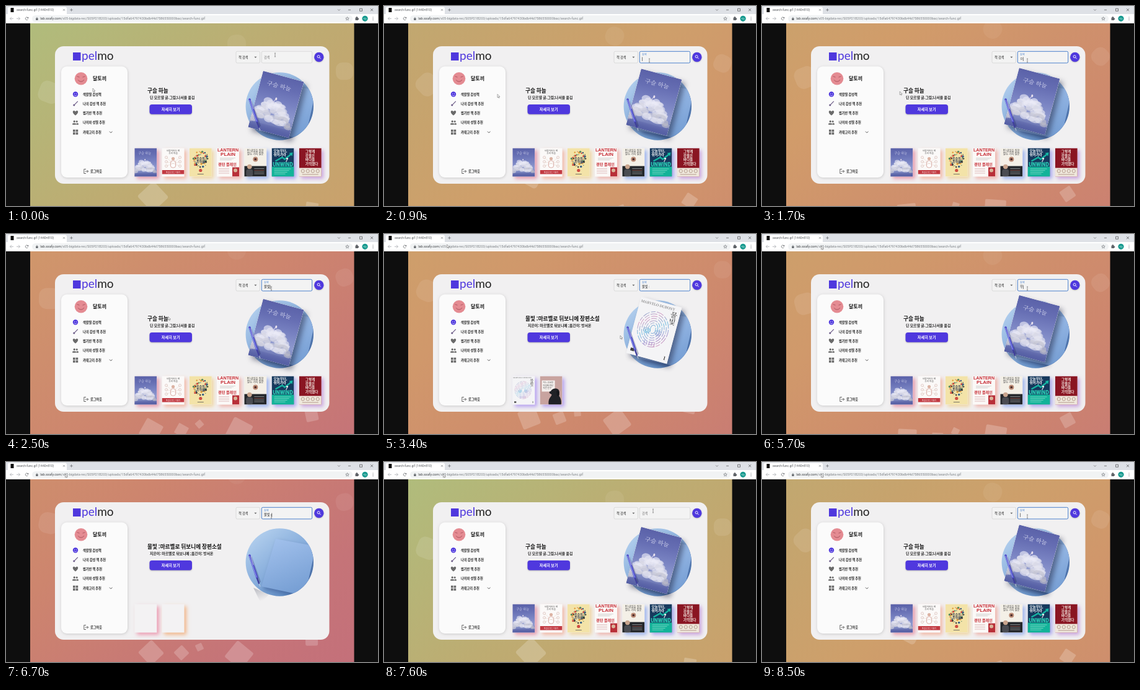
Write an HTML page with a canvas that moves like this. It is 600x323 px and loops after 8600 ms.

```html
<!DOCTYPE html>
<html lang="ko">
<head>
<meta charset="utf-8">
<title>Book search</title>
<style>
html, body { margin: 0; width: 100%; height: 100%; overflow: hidden; background: #0e0e0e; }
canvas { display: block; width: 600px; height: 323px; }
</style>
</head>
<body>
<canvas id="stage"></canvas>
<script>
const W = 600, H = 323, LOOP = 8600, CYCLE = 3800, LEAD = 50;
const SANS = '"Noto Sans CJK KR", "Noto Sans CJK", "Noto Sans", sans-serif';
const SERIF = '"Noto Serif CJK KR", "Noto Serif", serif';
const UI = 'Roboto, "Noto Sans", sans-serif';
const PURPLE = '#4f38de', INK = '#222';
const canvas = document.getElementById('stage');
const ctx = canvas.getContext('2d');
const dpr = window.devicePixelRatio || 1;
canvas.width = W * dpr;
canvas.height = H * dpr;

const clamp = (v, a, b) => Math.min(b, Math.max(a, v));
const lerp = (a, b, k) => a + (b - a) * k;

// keys: rows of [time, value, value, ...]
function track(keys, t) {
  let i = 0;
  while (i < keys.length - 2 && t >= keys[i + 1][0]) i++;
  const a = keys[i], b = keys[i + 1];
  const k = clamp((t - a[0]) / (b[0] - a[0]), 0, 1);
  return a.slice(1).map((v, j) => lerp(v, b[j + 1], k));
}

function text(s, x, y, size, color = INK, weight = 400, family = SANS, align = 'left') {
  ctx.font = `${weight} ${size}px ${family}`;
  ctx.textAlign = align;
  ctx.fillStyle = color;
  ctx.fillText(s, x, y);
}
function rect(x, y, w, h, color) {
  ctx.fillStyle = color;
  ctx.fillRect(x, y, w, h);
}
function round(x, y, w, h, r, color, stroke, lw = 0.6) {
  ctx.beginPath();
  ctx.roundRect(x, y, w, h, r);
  if (color) { ctx.fillStyle = color; ctx.fill(); }
  if (stroke) { ctx.strokeStyle = stroke; ctx.lineWidth = lw; ctx.stroke(); }
}
function dot(x, y, r, color) {
  ctx.beginPath();
  ctx.arc(x, y, r, 0, 7);
  ctx.fillStyle = color;
  ctx.fill();
}
function arc(x, y, r, a, b, color, lw) {
  ctx.beginPath();
  ctx.arc(x, y, r, a, b);
  ctx.strokeStyle = color;
  ctx.lineWidth = lw;
  ctx.stroke();
}
function line(color, lw, ...p) {
  ctx.beginPath();
  for (let i = 0; i < p.length; i += 2) ctx.lineTo(p[i], p[i + 1]);
  ctx.strokeStyle = color;
  ctx.lineWidth = lw;
  ctx.stroke();
}
function poly(color, ...p) {
  ctx.beginPath();
  for (let i = 0; i < p.length; i += 2) ctx.lineTo(p[i], p[i + 1]);
  ctx.closePath();
  ctx.fillStyle = color;
  ctx.fill();
}
function oval(x, y, rx, ry, color, turn = 0) {
  ctx.beginPath();
  ctx.ellipse(x, y, rx, ry, turn, 0, 7);
  ctx.fillStyle = color;
  ctx.fill();
}
function ramp(x0, y0, x1, y1, ...stops) {
  const g = ctx.createLinearGradient(x0, y0, x1, y1);
  stops.forEach((c, i) => g.addColorStop(i / (stops.length - 1), c));
  return g;
}
function shadow(color, blur, dx, dy, draw) {
  ctx.save();
  ctx.shadowColor = color;
  ctx.shadowBlur = blur * dpr;
  ctx.shadowOffsetX = dx * dpr;
  ctx.shadowOffsetY = dy * dpr;
  draw();
  ctx.restore();
}
function local(x, y, turn, sx, sy, draw) {
  ctx.save();
  ctx.translate(x, y);
  ctx.rotate(turn);
  ctx.scale(sx, sy);
  draw();
  ctx.restore();
}

function browser() {
  rect(0, 0, W, 13, '#dee1e6');
  round(3, 1.5, 95, 13, [3, 3, 0, 0], '#fff');
  rect(0, 13, W, 15, '#fff');
  rect(7.5, 3, 5, 7, '#111');
  text('search-func.gif (1440×810)', 17, 8.4, 5, '#55585c', 400, UI);
  const c = '#5f6368', pale = '#a9acb0';
  line(c, 0.6, 92, 4.8, 95, 7.8); line(c, 0.6, 95, 4.8, 92, 7.8);
  line(c, 0.7, 103.2, 6.3, 107.8, 6.3); line(c, 0.7, 105.5, 4, 105.5, 8.6);
  line('#555', 0.6, 535, 5.3, 537, 7.3, 539, 5.3);
  line('#333', 0.6, 552, 6.3, 556, 6.3);
  round(570.5, 4.2, 4, 4, 0, null, '#333');
  line('#333', 0.6, 588, 4.2, 592, 8.2); line('#333', 0.6, 592, 4.2, 588, 8.2);

  line(pale, 0.8, 12, 20.3, 6.5, 20.3); line(pale, 0.8, 9, 17.8, 6.5, 20.3, 9, 22.8);
  line(pale, 0.8, 17, 20.3, 22.5, 20.3); line(pale, 0.8, 20, 17.8, 22.5, 20.3, 20, 22.8);
  arc(33.5, 20.3, 2.3, 0.5, 5.6, c, 0.7);
  poly(c, 34.1, 19.9, 36.2, 19.9, 36.2, 17.6);
  round(42, 15, 517, 10.8, 5.4, '#f1f3f4');
  round(48.2, 19.8, 3.4, 3, 0.4, c);
  arc(49.9, 19.6, 1.1, Math.PI, 0, c, 0.6);
  const host = 'lab.ssafy.com';
  text(host, 55.3, 22.3, 5.45, '#3a3d41', 400, UI);
  const w = ctx.measureText(host).width;
  text('/s05-bigdata-rec/S05P21B203/uploads/15dfa64797430bdb44d7586550000bac/search-func.gif',
    55.3 + w, 22.3, 5.45, '#7c8085', 400, UI);
  ctx.beginPath();
  for (let i = 0; i < 10; i++) {
    const r = i % 2 ? 1.3 : 2.9, a = i * Math.PI / 5 - Math.PI / 2;
    ctx.lineTo(550.5 + r * Math.cos(a), 20.5 + r * Math.sin(a));
  }
  ctx.closePath();
  ctx.strokeStyle = c; ctx.lineWidth = 0.6; ctx.stroke();
  round(563.5, 18.5, 4.6, 4.6, 0.6, c);
  dot(565.8, 18.2, 1.1, c); dot(568.2, 20.8, 1.1, c);
  dot(579, 20.3, 4.6, '#15998e');
  text('하늘', 579, 21.5, 3, '#fff', 400, SANS, 'center');
  for (const y of [18, 20.3, 22.6]) dot(592, y, 0.6, c);
}

const HUES = [[176, 188, 124], [192, 168, 112], [209, 157, 106], [205, 134, 110], [196, 112, 122]];
function hue(u) {
  const p = clamp(u, 0, 1) * 4, i = Math.min(3, Math.floor(p));
  return `rgb(${HUES[i].map((v, j) => Math.round(lerp(v, HUES[i + 1][j], p - i)))})`;
}
// x, y at cycle start, size, speed (px/s)
const SQUARES = [
  [237, 310, 36, 40], [372, 62, 30, 14], [546, 106, 28, 14], [70, 140, 34, 14], [493, 328, 20, 14],
  [283, 373, 18, 22], [312, 358, 11, 20], [376, 356, 34, 15], [234, 373, 30, 22]
];
function backdrop(q) {
  const [u] = track([[0, 0], [50, 0], [950, 0.26], [2550, 0.56], [2950, 0.66], [3450, 0.45], [3800, 0.4]], q);
  ctx.save();
  ctx.beginPath();
  ctx.rect(39, 28, 522.5, 295);
  ctx.clip();
  rect(38, 28, 525, 295, ramp(110, -40, 490, 390, ...[0, 1, 2, 3, 4].map(i => hue(u + i * 0.1))));
  // squares turn into circles and fade as they rise
  for (const [x, y0, size, v] of SQUARES) {
    const y = y0 - v * q / 1000, p = clamp((377 - y) / 363, 0, 1);
    local(x, y, p * 4 * Math.PI, 1, 1, () =>
      round(-size / 2, -size / 2, size, size, size * p / 2, `rgba(255,255,255,${0.04 + 0.2 * (1 - p)})`));
  }
  ctx.restore();
}

function smile(x, y, r, color) {
  dot(x - r * 0.35, y - r * 0.25, r * 0.15, color);
  dot(x + r * 0.35, y - r * 0.25, r * 0.15, color);
  arc(x, y + r * 0.05, r * 0.55, 0.25, 2.9, color, r * 0.16);
}

const MENU = ['색깔별 감성책', '나의 감성 책 추천', '찜기반 책 추천', '나이와 성별 추천', '카테고리 추천'];
function sidebar() {
  shadow('rgba(0,0,0,.16)', 4, 0.5, 1, () => round(89, 97.5, 107, 179.5, 9, '#fbfbfb'));
  dot(121, 117.3, 10.3, '#e48b92');
  line('#9a4450', 0.7, 114.5, 113.5, 118.5, 115); line('#9a4450', 0.7, 123.5, 115, 127.5, 113.5);
  arc(121, 116.5, 5.5, 0.5, 2.6, '#9a4450', 0.8);
  text('달토끼', 140, 120.2, 8, '#111', 700);
  MENU.forEach((s, i) => text(s, 124, 144.6 + i * 15.25, 5.2, INK, 700));
  const g = '#6a6a6a';
  dot(112, 142.5, 4.2, PURPLE);
  smile(112, 142.5, 4, '#fff');
  line('#6a5a86', 1.2, 115.8, 153.8, 111, 158.8);
  dot(109.8, 160, 1.6, '#6a5a86');
  ctx.beginPath();
  ctx.moveTo(112, 176.8);
  ctx.bezierCurveTo(104, 170.5, 109.5, 166.5, 112, 170.5);
  ctx.bezierCurveTo(114.5, 166.5, 120, 170.5, 112, 176.8);
  ctx.fillStyle = g;
  ctx.fill();
  dot(110.2, 186.4, 1.6, g); dot(114.2, 186.4, 1.5, g);
  round(107.2, 189.2, 5.6, 2.6, [1.3, 1.3, 0, 0], g);
  round(113.4, 189.2, 3.4, 2.6, [1, 1, 0, 0], g);
  for (const [x, y] of [[108, 199.6], [112.6, 199.6], [108, 204.1], [112.6, 204.1]]) rect(x, y, 3.6, 3.6, g);
  line('#444', 0.9, 167, 202.6, 169.2, 204.8, 171.4, 202.6);
  line('#444', 0.8, 129, 263.5, 125.8, 263.5, 125.8, 270.5, 129, 270.5);
  line('#444', 0.8, 127.7, 267, 132.5, 267);
  line('#444', 0.8, 130.7, 265, 132.7, 267, 130.7, 269);
  text('로그아웃', 136, 269, 5.2, INK, 700);
}

const TYPED = [[0, ''], [1700, 'ㅁ'], [1850, '무'], [2000, '물'], [2250, '물비'], [2450, '물빛'], [2650, '물빛 '], [2800, '물빛 :']];
function header(q) {
  rect(108, 75, 12.5, 13, PURPLE);
  text('pel', 122, 87, 19, PURPLE, 400, 'Lato, sans-serif');
  text('mo', 122 + ctx.measureText('pel').width, 87, 19, '#222', 400, 'Lato, sans-serif');
  round(371, 73.3, 38.5, 18.7, 2, '#f3f3f3', '#cacaca');
  text('책 검색', 375, 84.5, 5.2, INK, 500);
  poly('#666', 400.4, 81.8, 404.4, 81.8, 402.4, 83.9);
  const focus = q > 500, blue = '#4a80cc';
  round(412.3, 73.3, 81.4, 18.7, 2, '#f3f3f3', focus ? blue : '#cacaca', focus ? 1 : 0.6);
  if (focus) {
    const s = TYPED.filter(k => q >= k[0]).pop()[1];
    text('검색', 416, 80.2, 4.1, blue, 500);
    text(s, 416, 87.4, 5.2, INK, 500);
    const x = 416.6 + ctx.measureText(s).width;
    if (q < 3200) line('#222', 0.6, x, 82.5, x, 88.9);
  } else text('검색', 416, 84.5, 5.2, '#777');
  shadow('rgba(0,0,0,.25)', 2, 0, 0.7, () => dot(504.8, 82.5, 7.7, PURPLE));
  arc(504.1, 81.7, 2, 0, 7, '#fff', 0.9);
  line('#fff', 1, 505.6, 83.2, 507.7, 85.3);
}

// large covers use a 66 x 98 box, the others 36 x 46
function clouds() {
  rect(0, 0, 66, 98, ramp(0, 0, 6, 98, '#5a61a8', '#666eb3', '#7983c2', '#8f9acf', '#5a64a6'));
  // cumulus: a heap of puffs, wide below and narrow at the top
  for (let i = 0; i < 46; i++) {
    const k = i / 45, spread = 9 + 23 * k;
    const x = 30 + spread * Math.sin(i * 2.4), y = 47 + 34 * k + 2 * Math.cos(i * 1.7);
    const v = Math.round(236 - 50 * (0.5 + 0.5 * Math.sin(i * 1.3)) * k);
    oval(x, y, 4.5 + i % 4 * 1.5, 4 + i % 3, `rgba(${v},${v},${v + 12},.65)`);
  }
  rect(0, 86, 66, 12, ramp(0, 84, 0, 98, 'rgba(90,98,168,.25)', '#555fa4'));
  oval(31, 40, 1.5, 2.5, '#e9e1ee');
  line('#d9d5ea', 1, 30, 42, 27, 47);
  text('구슬 하늘', 30, 21, 9.4, '#dfe1f4', 400, SERIF, 'center');
}
function maze() {
  rect(0, 0, 66, 98, '#f4f4f6');
  text('MARVELO DUBONY', 29, 8.5, 5.6, '#555', 400, SERIF, 'center');
  ctx.strokeStyle = ramp(8, 20, 52, 75, '#65b6d8', '#d79ac3', '#72bfe0', '#a899d2', '#de91b2');
  ctx.lineWidth = 1;
  for (let k = 0; k < 7; k++) {
    ctx.setLineDash([7 + k * 1.7, 2, 12 - k, 2.4]);
    ctx.lineDashOffset = k * 7;
    ctx.beginPath();
    ctx.ellipse(31, 48, 24 - k * 3.3, 30 - k * 3.8, 0, 0, 7);
    ctx.stroke();
  }
  ctx.setLineDash([]);
  for (const x of [22, 40]) for (const r of [5, 2.5]) {
    ctx.beginPath();
    ctx.ellipse(x, 52, r, r * 0.85, 0, 0, 7);
    ctx.stroke();
  }
  for (let i = 0; i < 5; i++) line(ctx.strokeStyle, 1, 23 + i * 4, 69, 23 + i * 4, 76);
  text('물', 57, 20, 11.5, '#333', 500, SERIF, 'center');
  text('빛', 57, 32, 11.5, '#333', 500, SERIF, 'center');
  rect(5, 87, 6, 5, '#444');
  text('1', 58, 93, 8, '#333', 600, SERIF);
}
function figure() {
  rect(0, 0, 36, 46, '#fbf9f8');
  text('사람이라는 먼', 18, 5, 3.8, '#555', 500, SANS, 'center');
  text('우리 마음', 18, 9.5, 3.8, '#555', 500, SANS, 'center');
  dot(18, 17, 2.6, '#dcb3a3');
  round(14, 20.5, 8, 11, 3, '#fff', '#c98a80', 0.7);
  for (let i = 0; i < 6; i++) {
    const x = i % 2 ? 29 : 7, y = 15 + (i >> 1) * 7;
    arc(x, y, 2, 0, 7, '#c9a096', 0.5);
    line('#ddc4bc', 0.4, x, y, 18, 25);
  }
  rect(0, 35.5, 36, 6.5, '#c23a42');
  text('마음을 읽는 이야기', 18, 40, 3, '#fff', 500, SANS, 'center');
}
function doodles() {
  rect(0, 0, 36, 46, '#f3e3a8');
  const tones = ['#cf4d41', '#345e83', '#e29b38', '#5d8a62', '#333'];
  for (let i = 0; i < 40; i++) {
    const a = i * 2.4, r = 8 + i % 4 * 1.7;
    dot(18 + r * Math.cos(a), 18 + r * 0.95 * Math.sin(a), 0.7 + i % 3 * 0.5, tones[i % 5]);
  }
  text('호수의', 18, 18, 5, '#2d344c', 700, SANS, 'center');
  text('조약돌', 18, 23.5, 5, '#2d344c', 700, SANS, 'center');
  dot(18, 36, 2.6, '#cf4d41');
  line('#444', 0.7, 13, 42, 23, 42);
}
function lantern() {
  rect(0, 0, 36, 46, '#fbf9f7');
  text('LANTERN', 18, 5.5, 7.2, '#c72c35', 700, '"Liberation Sans", sans-serif', 'center');
  text('PLAIN', 18, 12.7, 8, '#c72c35', 700, '"Liberation Sans", sans-serif', 'center');
  for (let i = 0; i < 3; i++) line('#aaa', 0.4, 5, 16 + i * 1.6, 30 - i * 3, 16 + i * 1.6);
  text('랜턴 플레인', 17, 28, 6.1, '#c72c35', 800, SANS, 'center');
  for (let i = 0; i < 4; i++) line('#c98a8c', 0.5, 3, 33 + i * 2.6, 20, 33 + i * 2.6);
  rect(25, 31, 11, 15, '#b82f38');
  dot(30, 36, 3, '#d9b49a');
}
function portrait() {
  rect(0, 0, 36, 46, '#f4f0e7');
  text('먼 내일을 위한', 18, 5.5, 4.5, '#444', 500, SANS, 'center');
  text('열두 가지 질문', 18, 10.5, 4.5, '#444', 500, SANS, 'center');
  dot(18, 18, 4, '#b98873');
  dot(18, 18, 1.8, '#4a2a28');
  rect(0, 29, 36, 17, '#24272b');
  dot(8.5, 30, 3.8, '#c9a58e');
  round(3, 34, 11, 12, 4, '#4a4c52');
  for (let i = 0; i < 4; i++) line(i === 1 ? '#cf6556' : '#c8c8c8', 0.6, 16, 33 + i * 2.8, 32, 33 + i * 2.8);
}
function unwind() {
  rect(0, 0, 36, 46, '#16395d');
  line('#16b4a2', 2.4, 6, 21, 17, 15, 21, 18, 31, 10);
  poly('#16b4a2', 28, 8, 34, 7, 33, 13);
  text('오늘부터,', 3, 6.5, 5.5, '#fff', 800);
  text('쉬어가라', 3, 12.8, 5.5, '#fff', 800);
  dot(25, 17, 1.6, '#f2f2f2');
  line('#fff', 1.2, 25, 19, 23, 22);
  rect(0, 30, 36, 16, '#12b399');
  text('UNWIND', 18, 29.3, 8.4, '#2bd0b7', 800, UI, 'center');
  for (let i = 0; i < 4; i++) line('#d7f2ea', 0.5, 4, 33.5 + i * 2.7, 31 - i * 3, 33.5 + i * 2.7);
}
function river() {
  rect(0, 0, 36, 46, '#8a1522');
  ['그렇게', '강물은', '바다를', '기억했다'].forEach((s, i) => text(s, 10, 7.5 + i * 6.6, 5.6, '#f7eee7', 700));
  rect(0, 32, 36, 14, '#efe8dc');
  for (let i = 0; i < 4; i++) arc(6 + i * 8, 37, 2.6, 0, 7, '#8d6756', 0.6);
  line('#8d6756', 0.6, 5, 42.5, 31, 42.5);
}
function dog() {
  rect(0, 0, 36, 46, '#c8a39f');
  rect(3, 7, 21, 18, '#f5f0ee');
  ['어느 고요한', '아침에 만난', '작은 친구'].forEach((s, i) => text(s, 5, 11.5 + i * 4.5, 3.4, '#444', 500));
  ctx.beginPath();
  ctx.moveTo(14, 46);
  ctx.bezierCurveTo(13, 35, 18, 34, 19, 30);
  ctx.bezierCurveTo(14, 25, 20, 19, 26, 20);
  ctx.bezierCurveTo(33, 21, 32, 29, 30, 31);
  ctx.bezierCurveTo(34, 35, 35, 42, 34, 46);
  ctx.fillStyle = '#202126';
  ctx.fill();
  oval(19, 27, 4, 2.2, '#202126', 0.25);
  oval(29, 28, 2, 4.5, '#15161a', -0.2);
}

const SHELF = [clouds, figure, doodles, lantern, portrait, unwind, river];
const GLOWS = ['#e69aad', '#f2b7a4', '#f0d5a0', '#efb5ad', '#9bb2ed', '#a8a4ee', '#c9a3dd'];
function shelf(found, loaded) {
  const books = found ? [maze, dog] : SHELF;
  books.forEach((paint, i) => {
    const x = 207.3 + i * 44.25, big = paint === clouds || paint === maze;
    const glow = loaded ? '#b5a0ef' : found ? ['#ed9db2', '#f2b78b'][i] : GLOWS[i];
    shadow(glow, 6, 3.5, 3.5, () => rect(x, 229.5, 36, 46, '#f3f2f3'));
    if (found && !loaded) return;
    local(x, 229.5, 0, big ? 36 / 66 : 1, big ? 46 / 98 : 1, () => {
      ctx.beginPath();
      ctx.rect(0, 0, big ? 66 : 36, big ? 98 : 46);
      ctx.clip();
      paint();
    });
  });
}

function pen() {
  ctx.lineCap = 'round';
  line('rgba(30,40,90,.3)', 3.5, 395, 154, 409, 193);
  line('#5150cc', 3.6, 393, 151, 405, 187);
  line('#98a2ee', 1, 392.5, 152, 404, 186);
  line('#d7d9ef', 0.8, 395, 152, 399, 166);
  line('#403f9c', 2.2, 405, 188, 408, 196);
  line('#c9ccdf', 1, 408.5, 197, 410, 201);
  ctx.lineCap = 'butt';
}
function hero(q, found, loaded) {
  ctx.save();
  dot(441.3, 162, 54.7, ramp(400, 115, 480, 212, '#b4d0ee', '#88aedc', '#5281bb'));
  ctx.beginPath();
  ctx.arc(441.3, 162, 54.7, 0, 7);
  ctx.clip();
  shadow('rgba(35,60,120,.45)', 7, 3, 4, () =>
    poly(ramp(430, 124, 465, 210, '#a2c1ec', '#779fd4'), 435, 124, 500, 136, 482, 216, 412, 201));
  ctx.restore();
  if (!found || loaded) {
    const bob = -3 + 3 * Math.cos((q - 50) / 1250 * 2 * Math.PI);
    local(435.5, 159 + bob, 15 * Math.PI / 180, 68 / 66, 94 / 98, () => {
      ctx.translate(-33, -49);
      shadow('rgba(25,30,60,.5)', 9, 5, 6, () => rect(0, 0, 66, 98, '#eee'));
      ctx.beginPath();
      ctx.rect(0, 0, 66, 98);
      ctx.clip();
      (found ? maze : clouds)();
    });
  } else {
    poly(ramp(400, 205, 408, 226, 'rgba(70,75,95,.3)', 'rgba(70,75,95,0)'), 399, 203, 424, 214, 411, 228);
  }
  pen();
}

function arrow(x, y) {
  local(x, y, 0, 0.85, 0.85, () => {
    poly('#fff', 0, 0, 0, 6.3, 1.5, 5, 2.6, 7.2, 3.6, 6.7, 2.6, 4.6, 4.6, 4.6);
    ctx.strokeStyle = '#555';
    ctx.lineWidth = 0.6;
    ctx.stroke();
  });
}
function beam(x, y) {
  line('#555', 0.6, x, y - 3, x, y + 3);
  line('#555', 0.5, x - 1.1, y - 3, x + 1.1, y - 3);
  line('#555', 0.5, x - 1.1, y + 3, x + 1.1, y + 3);
}

function page(q) {
  const found = q >= 2750, loaded = q >= 3200;
  backdrop(q);
  round(79, 65, 442.5, 222, 14, '#f1f0f1');
  header(q);
  sidebar();
  text(found ? '물빛 :마르벨로 뒤보니에 장편소설' : '구슬 하늘', 228, 140.3, 8.65, '#111', 700);
  text(found ? '지은이: 마르벨로 뒤보니에 ;옮긴이: 방서온' : '딘 모르넬 글.그림;나서율 옮김', 232, 150, 5.85, INK, 700);
  shadow('rgba(0,0,0,.25)', 2, 0, 1, () => round(231.5, 159, 68.5, 15.8, 4, PURPLE));
  text('자세히 보기', 265.8, 169.2, 6.2, '#fff', 700, SANS, 'center');
  shelf(found, loaded);
  hero(q, found, loaded);
  const [x, y] = track([[50, 434, 79], [450, 428, 88], [2950, 428, 88], [3350, 381, 164], [3800, 381, 164]], q);
  if (q < 3000) beam(x, y);
  else arrow(x, y);
}

const POINTER = [[0, 140, 133], [900, 183, 142.5], [2500, 261.5, 133.5], [2800, 261.5, 133.5],
  [3400, 101.5, 17], [3700, 98, 19], [4700, 95.5, 19.5], [LOOP, 95.5, 19.5]];

function draw(t) {
  ctx.setTransform(dpr, 0, 0, dpr, 0, 0);
  rect(0, 0, W, H, '#0e0e0e');
  page((t + LEAD) % CYCLE);
  browser();
  arrow(...track(POINTER, t));
}

const start = performance.now();
function tick() {
  const t = (performance.now() - start) % LOOP;
  draw(Math.floor(t / 100) * 100);
  requestAnimationFrame(tick);
}
tick();
</script>
</body>
</html>
```
